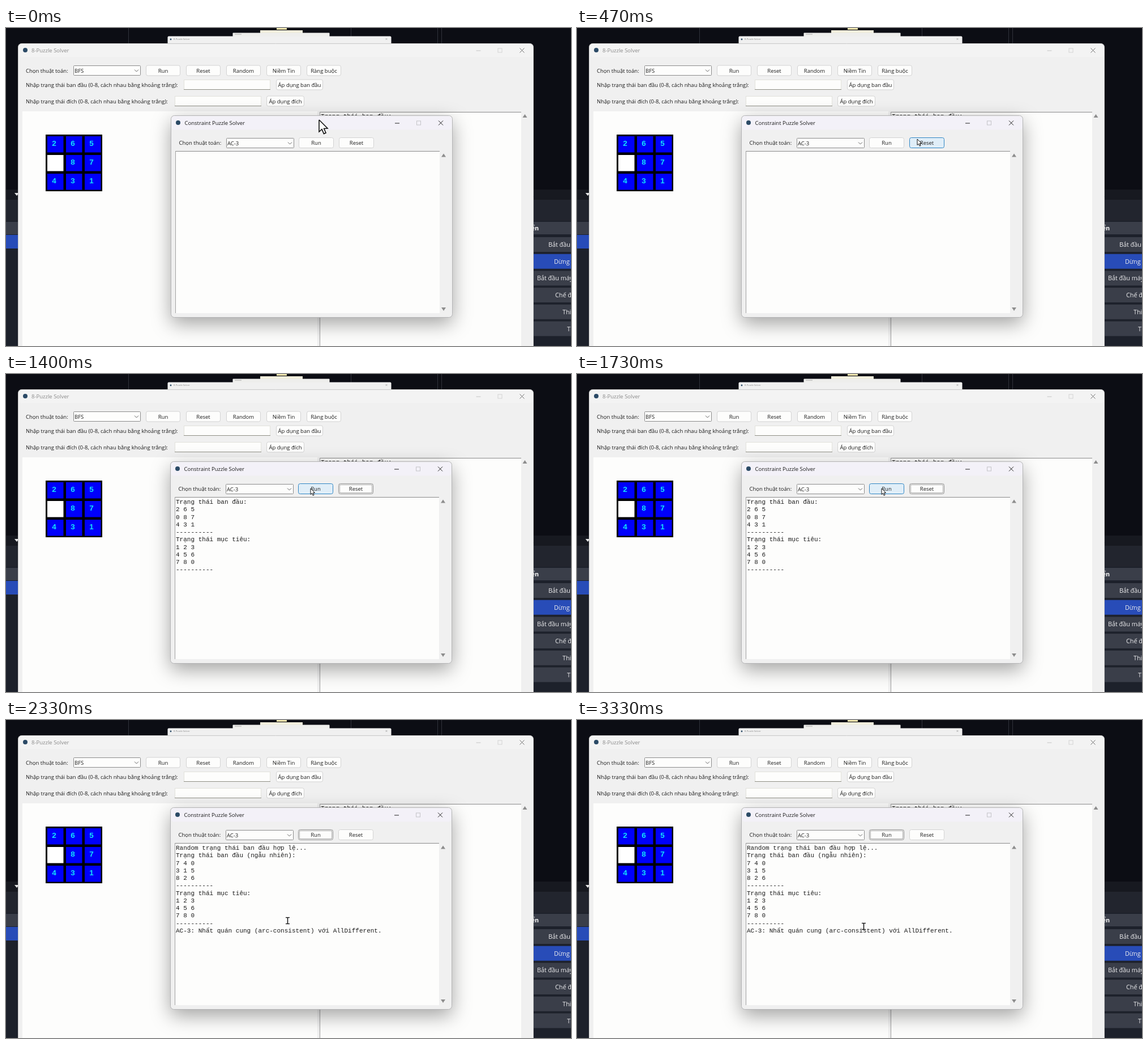
Write an HTML page with a canvas that moves like this. It is 998 by 561 pixels and loops after 3360 ms.

```html
<!DOCTYPE html>
<html lang="vi">
<head>
<meta charset="utf-8">
<title>Puzzle solver</title>
<style>
html, body { margin: 0; width: 100%; height: 100%; overflow: hidden; background: #0c0d14; }
canvas { display: block; }
</style>
</head>
<body>
<canvas id="stage" width="998" height="561"></canvas>
<script>
const ctx = document.getElementById('stage').getContext('2d');
const LOOP = 3360, DROP = 50, RESET = 570, RUN = 1980;
const UI = '"Open Sans", "Noto Sans", sans-serif';
const MONO = '11.03px "Liberation Mono", monospace';
const INK = '#1c1c1c', FACE = '#f0f0f0', PAPER = '#fdfdfc';

const GOAL = ['----------', 'Trạng thái mục tiêu:', '1 2 3', '4 5 6', '7 8 0', '----------'];
const INITIAL = ['Trạng thái ban đầu:', '2 6 5', '0 8 7', '4 3 1', ...GOAL];
const SOLVED = ['Random trạng thái ban đầu hợp lệ...', 'Trạng thái ban đầu (ngẫu nhiên):',
  '7 4 0', '3 1 5', '8 2 6', ...GOAL, 'AC-3: Nhất quán cung (arc-consistent) với AllDifferent.'];

// Pointer stops: time, x, y
const PATH = [[0, 553, 162], [60, 553, 162], [380, 601, 196], [480, 601, 196], [600, 605, 191],
  [830, 605, 191], [1180, 538, 202], [2020, 538, 202], [2290, 497, 354], [2700, 497, 354],
  [3100, 506, 364], [LOOP, 506, 364]];

function rect(x, y, w, h, fill) {
  ctx.fillStyle = fill;
  ctx.fillRect(x, y, w, h);
}

function box(x, y, w, h, r, fill, stroke) {
  ctx.beginPath();
  ctx.roundRect(x + .5, y + .5, w - 1, h - 1, r);
  ctx.fillStyle = fill;
  ctx.fill();
  if (stroke) {
    ctx.strokeStyle = stroke;
    ctx.lineWidth = 1;
    ctx.stroke();
  }
}

function text(str, x, y, color = INK, font = `9.5px ${UI}`, align = 'left') {
  ctx.font = font;
  ctx.textAlign = align;
  ctx.fillStyle = color;
  ctx.fillText(str, x, y);
}

function lines(points, color, width = 1) {
  ctx.beginPath();
  points.forEach(([x, y], i) => i ? ctx.lineTo(x, y) : ctx.moveTo(x, y));
  ctx.strokeStyle = color;
  ctx.lineWidth = width;
  ctx.stroke();
}

function fillShape(points, color) {
  ctx.beginPath();
  points.forEach(([x, y]) => ctx.lineTo(x, y));
  ctx.closePath();
  ctx.fillStyle = color;
  ctx.fill();
}

function dot(x, y, r) {
  ctx.beginPath();
  ctx.arc(x, y, r, 0, 7);
  ctx.fillStyle = '#2b4a66';
  ctx.fill();
}

function button(label, x, y, w, h, hover, focus) {
  const edge = hover ? '#2f86c4' : focus ? '#8f8f8f' : '#d3d3d3';
  box(x, y, w, h, 3, hover ? '#e0eef8' : PAPER, edge);
  if (focus) {
    ctx.setLineDash([1, 1]);
    ctx.strokeStyle = '#555';
    ctx.strokeRect(x + 2.5, y + 2.5, w - 5, h - 5);
    ctx.setLineDash([]);
  }
  text(label, x + w / 2, y + h / 2 + 3.5, INK, undefined, 'center');
}

function combo(label, x, y, w) {
  box(x, y, w, 18, 1, PAPER, '#8c8c8c');
  text(label, x + 2, y + 12.5);
  lines([[x + w - 11, y + 7.5], [x + w - 7.5, y + 11], [x + w - 4, y + 7.5]], '#666');
}

function entry(x, y, w) {
  rect(x, y, w, 18, '#e2e2dc');
  rect(x + 1, y + 1, w - 2, 16, PAPER);
  rect(x, y + 17, w, 1, '#8f8f86');
}

function arrow(x, y, dir) {
  fillShape([[x - 4, y + 3 * dir], [x, y - 3 * dir], [x + 4, y + 3 * dir]], '#8d8d8d');
}

function controls(x, y, minColor, maxColor, closeColor) {
  lines([[x - 81, y + .5], [x - 73, y + .5]], minColor);
  ctx.strokeStyle = maxColor;
  ctx.strokeRect(x - 42.5, y - 3.5, 7, 7);
  lines([[x - 4, y - 4], [x + 4, y + 4]], closeColor);
  lines([[x + 4, y - 4], [x - 4, y + 4]], closeColor);
}

function textPane(x, y, w, h) {
  rect(x, y, w, h, PAPER);
  rect(x, y, w, 1, '#8a8a8a');
  rect(x, y, 1, h, '#a0a0a0');
}

function drawBackdrop() {
  rect(0, 0, 998, 561, '#0c0d14');
  [216, 609, 762, 769].forEach(x => rect(x, 0, 1, 27, '#30323b'));
  rect(478, 0, 18, 3, '#e9dfa9');
  rect(449, 4, 75, 5, '#f1eedc');
  box(400, 8, 172, 8, 1, '#eeeeec');
  rect(404, 10.5, 12, 1, '#aaa');
  box(285, 14, 396, 16, 2, FACE);
  dot(291, 20, 1.4);
  text('8-Puzzle Solver', 296, 21, '#858585', `4.1px ${UI}`);
  lines([[670.5, 18], [673.5, 21]], '#999', .7);
  lines([[673.5, 18], [670.5, 21]], '#999', .7);

  rect(0, 285, 998, 276, '#1d212b');
  rect(0, 285, 998, 18, '#171920');
  rect(0, 303, 998, 37, '#22252e');
  rect(0, 342, 998, 22, '#3a3e49');
  rect(0, 365, 22, 24, '#284cb8');
  fillShape([[15, 291], [23, 291], [19, 296]], '#e4e4e4');
  text('Điều khiển', 941, 356.5, '#fff', `bold 10.8px ${UI}`, 'right');
  [['Bắt đầu ghi', 958], ['Dừng ghi hình', 968], ['Bắt đầu máy ảo', 938],
    ['Chế độ', 970], ['Thiết lập', 983], ['Thoát', 991]].forEach(([label, x], i) => {
    const y = 369 + i * 29.7;
    rect(925, y, 73, 26, i === 1 ? '#284cb8' : '#3a3e49');
    text(label, x, y + 17, '#ececee', `10.8px ${UI}`);
  });
}

function drawMain() {
  box(21, 27, 911, 560, 6, FACE, '#c9c9c9');
  box(22, 28, 909, 24, 5, '#f3f3f3');
  dot(34, 39, 4);
  text('8-Puzzle Solver', 45, 42.5, '#8b8b8b');
  controls(911.5, 39.5, '#c4c4c4', '#d4d4d4', '#707070');

  text('Chọn thuật toán:', 35, 78.5);
  combo('BFS', 119, 66, 119);
  ['Run', 'Reset', 'Random', 'Niềm Tin', 'Ràng buộc'].forEach((label, i) =>
    button(label, 247 + i * 71, 65.5, 61, 19));
  text('Nhập trạng thái ban đầu (0-8, cách nhau bằng khoảng trắng):', 35, 103.5);
  entry(314, 91, 153);
  button('Áp dụng ban đầu', 477, 90.5, 83, 19);
  text('Nhập trạng thái đích (0-8, cách nhau bằng khoảng trắng):', 35, 132.5);
  entry(298, 120, 153);
  button('Áp dụng đích', 460, 119.5, 67, 19);

  rect(29, 147, 521, 414, PAPER);
  textPane(554, 148, 356, 413);
  text('Trạng thái ban đầu:', 556, 159, INK, MONO);
  arrow(916.5, 155, 1);

  rect(70, 188, 100, 100, '#000');
  [...'265 87431'].forEach((digit, i) => {
    const x = 73 + i % 3 * 33, y = 191 + Math.floor(i / 3) * 33;
    rect(x, y, 28.5, 28.5, digit === ' ' ? '#fff' : '#0000fb');
    text(digit, x + 12, y + 16.5, '#12e4fa', 'bold 13.5px "Liberation Sans", sans-serif', 'center');
  });
}

function drawPopup(x, output, hover, focus) {
  ctx.save();
  ctx.shadowColor = 'rgba(0,0,0,.36)';
  ctx.shadowBlur = 34;
  ctx.shadowOffsetY = 11;
  box(x, 154, 498, 357, 6, FACE);
  ctx.restore();
  box(x, 154, 498, 357, 6, FACE, '#b4b4b6');
  box(x + 1, 155, 496, 25, 5, '#f3f1f8');
  dot(x + 13, 167, 4);
  text('Constraint Puzzle Solver', x + 24.5, 170.5);
  controls(x + 477, 167.5, '#222', '#c4c4c8', '#222');
  text('Chọn thuật toán:', x + 14.5, 206);
  combo('AC-3', x + 98, 194, 120);
  ['Run', 'Reset'].forEach((label, i) =>
    button(label, x + 226 + i * 71, 193, 62, 19, hover === label, focus === label));
  textPane(x + 8, 217, 467, 286);
  arrow(x + 482, 224.5, 1);
  arrow(x + 482, 496, -1);
  output.forEach((line, i) => text(line, x + 10, 229 + i * 13.25, INK, MONO));
}

function pointerAt(t) {
  const i = Math.max(1, PATH.findIndex(stop => stop[0] > t));
  const [t0, x0, y0] = PATH[i - 1], [t1, x1, y1] = PATH[i];
  const u = (t - t0) / (t1 - t0), k = u * u * (3 - 2 * u);
  return [x0 + (x1 - x0) * k, y0 + (y1 - y0) * k];
}

function drawPointer(x, y, size) {
  if (y > 217) {
    lines([[x - 3, y - 5.5], [x + 4, y - 5.5]], '#111', 1.3);
    lines([[x + .5, y - 5.5], [x + .5, y + 5.5]], '#111', 1.5);
    lines([[x - 3, y + 5.5], [x + 4, y + 5.5]], '#111', 1.3);
    return;
  }
  const shape = [[0, 0], [0, 10.5], [2.5, 8.3], [4.2, 12.3], [6, 11.5], [4.3, 7.7], [7.5, 7.5]]
    .map(([px, py]) => [x + px * size, y + py * size]);
  fillShape(shape, '#fff');
  lines([...shape, shape[0]], '#111', size > 1 ? 1.6 : 1);
}

function frame(now) {
  const t = now % LOOP, [x, y] = pointerAt(t), dragging = t < DROP;
  const inRow = y > 190 && y < 213;
  const hover = inRow && x > 587 && x < 649 ? 'Reset' : inRow && x > 516 && x < 578 ? 'Run' : '';
  const focus = t < RESET ? '' : t < RUN ? 'Reset' : 'Run';
  drawBackdrop();
  drawMain();
  drawPopup(dragging ? 291 : 290, t < RESET ? [] : t < RUN ? INITIAL : SOLVED, hover, focus);
  drawPointer(x, y, dragging ? 2 : 1);
  requestAnimationFrame(frame);
}
requestAnimationFrame(frame);
</script>
</body>
</html>
```
